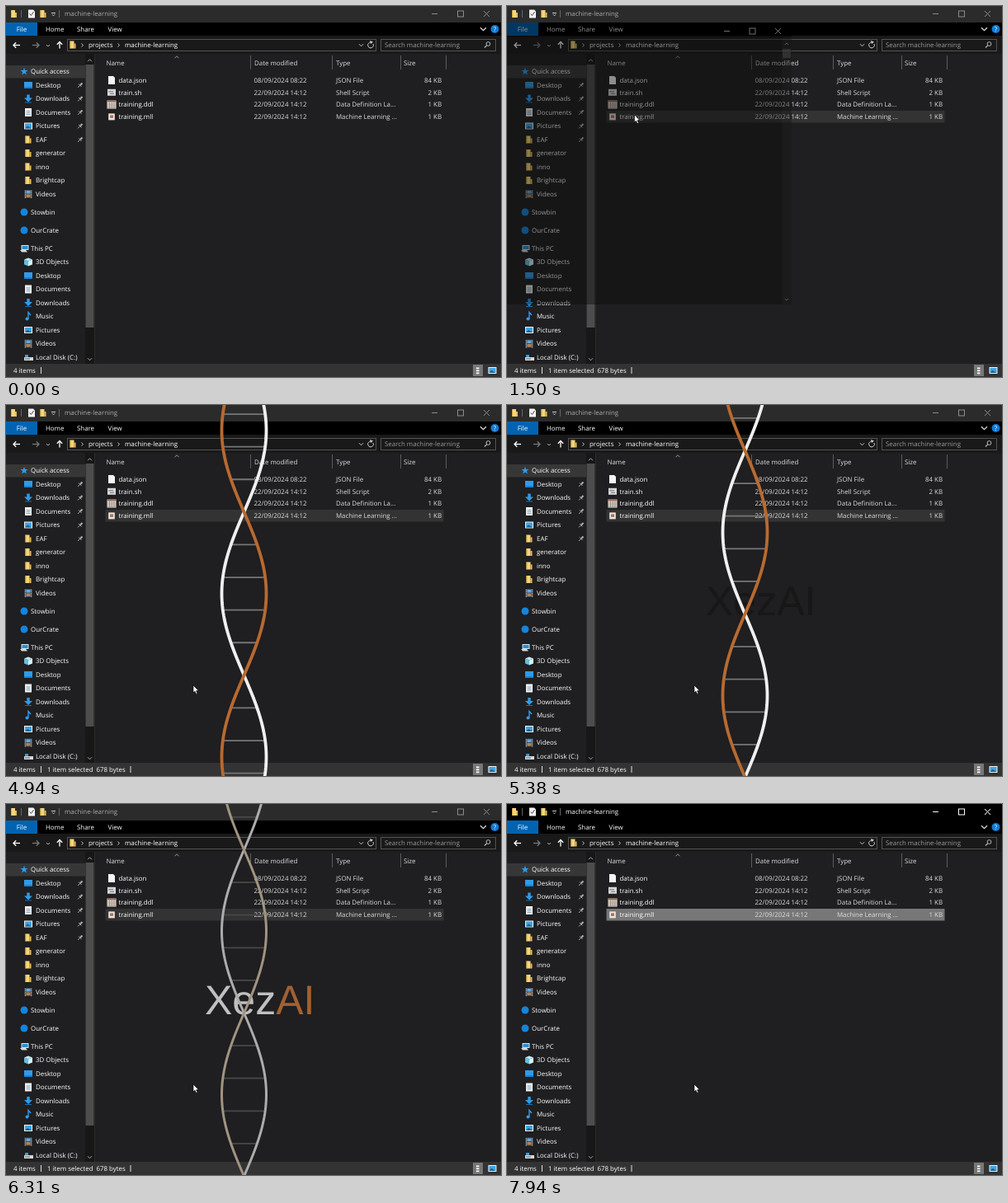
Recreate the animation shown at these times as an HTML page with a canvas. Size 600 px wide and 450 px high, loop 8000 ms.

```html
<!DOCTYPE html>
<html lang="en">
<head>
<meta charset="utf-8">
<title>File window and helix</title>
<style>
html, body { margin: 0; width: 100%; height: 100%; overflow: hidden; background: #000; }
canvas { display: block; width: 600px; height: 450px; }
</style>
</head>
<body>
<canvas width="600" height="450"></canvas>
<script>
const c = document.querySelector('canvas').getContext('2d');
c.textRendering = 'geometricPrecision';
const LOOP = 8000;
const UI = '"Open Sans", "Noto Sans", sans-serif';
const YELLOW = '#f5d67b', BLUE = '#2f9be8';

const clamp = (v) => Math.min(1, Math.max(0, v));
const span = (t, a, b) => clamp((t - a) / (b - a));
const mix = (a, b, k) => a + (b - a) * k;
const mixRgb = (a, b, k) => `rgb(${a.map((v, i) => Math.round(mix(v, b[i], k)))})`;

function box(x, y, w, h, color) {
  c.fillStyle = color;
  c.fillRect(x, y, w, h);
}
function frame(x, y, w, h, color, lw = 1) {
  c.strokeStyle = color;
  c.lineWidth = lw;
  c.strokeRect(x, y, w, h);
}
// Points are given as x, y pairs.
function trace(p) {
  c.beginPath();
  for (let i = 0; i < p.length; i += 2) c.lineTo(p[i], p[i + 1]);
}
function line(p, color, lw = 1) {
  trace(p);
  c.strokeStyle = color;
  c.lineWidth = lw;
  c.stroke();
}
function poly(p, color) {
  trace(p);
  c.fillStyle = color;
  c.fill();
}
function disc(x, y, r, color) {
  c.beginPath();
  c.arc(x, y, r, 0, 7);
  c.fillStyle = color;
  c.fill();
}
function text(s, x, y, color = '#fff', align = 'left', size = 7.9) {
  c.font = `${size}px ${UI}`;
  c.textAlign = align;
  c.fillStyle = color;
  c.fillText(s, x, y + 2.8);
}
// Chevron whose tip points along (dx, dy).
function chevron(x, y, dx, dy, r, color, lw = 1) {
  const h = r / 2;
  line([x - dx * h - dy * r, y - dy * h - dx * r, x + dx * h, y + dy * h,
    x - dx * h + dy * r, y - dy * h + dx * r], color, lw);
}
function arrow(x, y, dx, dy, color) {
  line([x - dx * 4, y - dy * 4, x + dx * 4, y + dy * 4], color, 1.3);
  chevron(x + dx * 2.4, y + dy * 2.4, dx, dy, 3.2, color, 1.3);
}

// Icons, each centred on x, y.
const icons = {
  folder(x, y) {
    box(x - 3.5, y - 4.5, 5, 9, YELLOW);
    box(x + 1.5, y - 1.5, 2, 6, '#e7bd55');
    box(x - 3.5, y - 4.5, 1, 9, '#dcae48');
  },
  star(x, y) {
    const p = [];
    for (let i = 0; i < 10; i++) {
      const r = i % 2 ? 2 : 4.8, a = i * Math.PI / 5 - Math.PI / 2;
      p.push(x + r * Math.cos(a), y + r * Math.sin(a));
    }
    poly(p, BLUE);
  },
  desktop(x, y) {
    box(x - 5, y - 4, 10, 8, '#1683d8');
    box(x - 5, y - 4, 10, 6, BLUE);
  },
  download(x, y) {
    box(x - 1.7, y - 5, 3.4, 5, BLUE);
    poly([x - 5, y - 1, x + 5, y - 1, x, y + 4], BLUE);
    box(x - 4, y + 4, 8, 1, '#1c6fae');
  },
  doc(x, y) {
    box(x - 4, y - 5, 8, 10, '#f2f2f2');
    for (let i = -2; i < 4; i += 2) box(x - 2.5, y + i, 5, 0.8, '#6b93ad');
  },
  picture(x, y) {
    box(x - 5, y - 4, 10, 8, '#f2f2f2');
    box(x - 4, y - 3, 8, 6, '#3ca4e8');
    poly([x - 4, y + 3, x - 1, y, x + 4, y + 3], '#235f80');
  },
  video(x, y) {
    box(x - 4.5, y - 5, 9, 10, '#3a4b5e');
    box(x - 2.5, y - 4, 5, 3.5, '#63abe0');
    box(x - 2.5, y + 0.5, 5, 3.5, '#b98245');
    for (let i = -4; i < 5; i += 2) {
      box(x - 4.2, y + i, 1, 1, '#ddd');
      box(x + 3.2, y + i, 1, 1, '#ddd');
    }
  },
  music(x, y) {
    disc(x - 1.5, y + 3, 2, BLUE);
    line([x, y + 3, x, y - 5, x + 3, y - 1.5], BLUE, 1.4);
  },
  cube(x, y) {
    poly([x, y - 5, x + 5, y - 3, x, y - 1, x - 5, y - 3], '#b9eaf7');
    poly([x - 5, y - 3, x, y - 1, x, y + 5, x - 5, y + 3], '#64bfdc');
    poly([x + 5, y - 3, x, y - 1, x, y + 5, x + 5, y + 3], '#d6f3fa');
  },
  pc(x, y) {
    box(x - 3.5, y - 4, 9, 6, '#cfe6f4');
    box(x - 2.5, y - 3, 7, 4, '#2c8ccc');
    poly([x - 5, y + 2, x + 2, y + 2, x + 4, y + 4.5, x - 3, y + 4.5], '#d8d8d8');
  },
  drive(x, y) {
    box(x - 5, y, 11, 4, '#d7d7d7');
    box(x - 4, y + 1.5, 6, 1, '#666');
    box(x - 4, y - 3, 4, 3, BLUE);
  },
  mark(x, y) { disc(x, y, 4.5, '#1484dc'); },
  file(x, y) {
    poly([x - 4, y - 5, x + 2, y - 5, x + 4, y - 3, x + 4, y + 5, x - 4, y + 5], '#f4f4f4');
  },
  script(x, y) {
    box(x - 5, y - 4, 10, 8, '#d7d7dc');
    box(x - 4, y - 1.5, 6, 1, '#777');
    box(x - 2, y + 1, 5, 1, '#777');
  },
  table(x, y) {
    box(x - 5.5, y - 5, 11, 10, '#e5e0da');
    box(x - 5.5, y - 5, 11, 2, '#a4705a');
    for (let i = 0; i < 3; i++) {
      box(x - 5.5, y - 1 + i * 2.2, 11, 0.7, '#8c7e78');
      box(x - 3 + i * 2.8, y - 3, 0.7, 8, '#8c7e78');
    }
  },
  model(x, y) {
    box(x - 3.8, y - 4, 7.6, 8, '#ece4df');
    box(x - 2, y - 2, 4, 3.5, '#b0705c');
  }
};

// icon, label, y, nesting level, pinned
const sidebar = [
  ['star', 'Quick access', 79.5, 0],
  ['desktop', 'Desktop', 96, 1, 1], ['download', 'Downloads', 112.5, 1, 1],
  ['doc', 'Documents', 129, 1, 1], ['picture', 'Pictures', 145.5, 1, 1],
  ['folder', 'EAF', 162, 1, 1], ['folder', 'generator', 178.5, 1],
  ['folder', 'inno', 195, 1], ['folder', 'Brightcap', 211.5, 1],
  ['video', 'Videos', 228, 1],
  ['mark', 'Stowbin', 250, 0], ['mark', 'OurCrate', 272, 0], ['pc', 'This PC', 294, 0],
  ['cube', '3D Objects', 310.5, 1], ['desktop', 'Desktop', 327, 1],
  ['doc', 'Documents', 343.5, 1], ['download', 'Downloads', 360, 1],
  ['music', 'Music', 376.5, 1], ['picture', 'Pictures', 393, 1],
  ['video', 'Videos', 409.5, 1], ['drive', 'Local Disk (C:)', 426, 1]
];
const files = [
  ['file', 'data.json', '08/09/2024 08:22', 'JSON File', '84 KB'],
  ['script', 'train.sh', '22/09/2024 14:12', 'Shell Script', '2 KB'],
  ['table', 'training.ddl', '22/09/2024 14:12', 'Data Definition La...', '1 KB'],
  ['model', 'training.mll', '22/09/2024 14:12', 'Machine Learning ...', '1 KB']
];

function windowButtons(x, y, gap, color) {
  line([x - 3.5, y, x + 3.5, y], color);
  frame(x + gap - 3.5, y - 3.5, 7, 7, color);
  const k = x + gap * 2;
  line([k - 3.5, y - 3.5, k + 3.5, y + 3.5], color);
  line([k - 3.5, y + 3.5, k + 3.5, y - 3.5], color);
}

function drawTop(focused) {
  box(0, 0, 600, 36, '#000');
  if (!focused) box(0, 0, 600, 20, '#2b2b2b');
  icons.folder(9.5, 9.5);
  box(18, 5, 1, 9, '#666');
  icons.file(31, 9.5);
  line([28.5, 9.5, 30.5, 11.5, 33.5, 7], '#444');
  icons.folder(45, 9.5);
  box(55, 8, 5, 1, '#ccc');
  chevron(57.5, 11, 0, 1, 1.6, '#ccc');
  box(64, 5, 1, 9, '#666');
  text('machine-learning', 71, 9.5, focused ? '#fff' : '#aaa');
  windowButtons(519.5, 9.5, 31.5, focused ? '#fff' : '#8c8c8c');

  box(0, 20, 38, 16, '#0063b1');
  text('File', 19, 28, '#fff', 'center');
  text('Home', 48, 28);
  text('Share', 86, 28);
  text('View', 123.5, 28);
  chevron(578.5, 28, 0, 1, 3.5, '#ddd', 1.2);
  disc(592.5, 28, 5, '#0f7bd7');
  text('?', 592.5, 28, '#fff', 'center');

  box(0, 36, 600, 22, '#191919');
  arrow(13, 47.5, -1, 0, '#fff');
  arrow(36, 47.5, 1, 0, '#777');
  chevron(51, 48, 0, 1, 2, '#aaa');
  arrow(65, 47.5, 0, -1, '#fff');
  frame(74.5, 40.5, 374, 14, '#535353');
  icons.folder(81, 47);
  chevron(92.5, 47.5, 1, 0, 2, '#ccc');
  text('projects', 100, 47);
  chevron(136.5, 47.5, 1, 0, 2, '#ccc');
  text('machine-learning', 144, 47);
  chevron(430.5, 47.5, 0, 1, 2.5, '#ccc');
  c.beginPath();
  c.arc(442, 47.5, 3.4, -0.5, 4.9);
  c.stroke();
  poly([441, 42, 445, 43.5, 442, 46], '#ccc');
  frame(454.5, 40.5, 139, 14, '#535353');
  text('Search machine-learning', 459, 47, '#9a9a9a');
  c.beginPath();
  c.arc(584.5, 46, 2.4, 0, 7);
  c.strokeStyle = '#bbb';
  c.stroke();
  line([582.7, 47.8, 580, 50.5], '#bbb', 1.2);
}

function drawSidebar() {
  box(0, 72, 96, 15.5, '#373737');
  for (const [icon, label, y, level, pinned] of sidebar) {
    icons[icon](level ? 27 : 22, y);
    text(label, level ? 36 : 30, y);
    if (pinned) {
      line([87, y + 3, 90, y], '#aaa');
      line([88, y - 1.5, 91.5, y + 2], '#aaa');
      line([90, y, 92.5, y - 2.5], '#aaa', 2.2);
    }
  }
  box(96, 58, 11, 376, '#171717');
  box(96.5, 71, 10, 319, '#4d4d4d');
  chevron(101.5, 66, 0, -1, 2.5, '#aaa');
  chevron(101.5, 428.5, 0, 1, 2.5, '#aaa');
  box(107, 58, 1, 376, '#2a2a2a');
}

function drawFiles(rowColor) {
  for (const x of [296, 395, 478, 533]) box(x, 60, 1, 17, '#5c5c5c');
  chevron(207, 62, 0, -1, 2.5, '#999');
  text('Name', 121.5, 69, '#dedede');
  text('Date modified', 301, 69, '#dedede');
  text('Type', 400, 69, '#dedede');
  text('Size', 482, 69, '#dedede');
  if (rowColor) box(120.5, 127, 410, 14.5, rowColor);
  files.forEach(([icon, name, date, type, size], i) => {
    const y = 90 + i * 14.8;
    icons[icon](128, y);
    text(name, 136.5, y);
    text(date, 300.5, y, '#dedede');
    text(type, 400, y, '#dedede');
    text(size, 528, y, '#dedede', 'right');
  });
}

function drawStatus(selected) {
  box(0, 434, 600, 16, '#333');
  text('4 items', 9, 442);
  box(42, 438, 1, 8, '#ddd');
  if (selected) {
    text('1 item selected', 50, 442);
    text('678 bytes', 109.5, 442);
    box(150.5, 438, 1, 8, '#ddd');
  }
  box(566, 435, 12, 14, '#777');
  for (let i = 0; i < 3; i++) box(570, 438.5 + i * 3, 3.5, 1.7, '#fff');
  icons.picture(589.5, 442);
}

function drawExplorer(t) {
  const focused = (t > 1180 && t < 1420) || t > 7850;
  const selected = t > 1180;
  const rowColor = selected ? (focused ? '#777' : '#333') : t > 1000 && '#4d4d4d';
  box(0, 0, 600, 450, '#1f1e20');
  drawTop(focused);
  drawSidebar();
  drawFiles(rowColor);
  drawStatus(selected);
}

function drawConsole(alpha) {
  c.globalAlpha = alpha;
  box(0, 20, 345, 18, '#000');
  box(0, 38, 333.5, 324, '#0c0c0c');
  windowButtons(266.5, 30.5, 31, '#fff');
  box(333.5, 38, 11.5, 324, '#171717');
  box(334, 52, 10, 11, '#4d4d4d');
  chevron(339, 46, 0, -1, 2.2, '#aaa');
  chevron(339, 356, 0, 1, 2.2, '#aaa');
  c.globalAlpha = 1;
}

function drawCursor(x, y) {
  const p = [0, 0, 0, 9, 2, 7.2, 3.5, 10.5, 5, 9.8, 3.6, 6.7, 6.3, 6.5];
  c.save();
  c.translate(x, y);
  poly(p, '#fff');
  c.closePath();
  c.strokeStyle = '#000';
  c.lineWidth = 0.6;
  c.stroke();
  c.restore();
}

const HALF = 198, MID = 288.5, AMP = 27;

function drawHelix(t) {
  const cross = mix(130, 55.5, span(t, 4940, 5380));
  const dim = span(t, 5400, 6310), out = span(t, 6310, 7250);
  if (out === 1) return;
  const swing = (y) => AMP * Math.sin(Math.PI * (y - cross) / HALF);
  const width = mix(3.8, 3, dim);
  c.globalAlpha = 1 - out;
  const rung = mixRgb([118, 118, 118], [72, 72, 72], dim);
  for (let i = -4; i < 12; i++) {
    const y = cross + i * HALF / 5, d = swing(y);
    line([MID - d, y, MID + d, y], rung, 1.8);
  }
  const strand = (side, color) => {
    const p = [];
    for (let y = -4; y <= 456; y += 4) p.push(MID + side * swing(y), y);
    line(p, color, width);
  };
  strand(-1, mixRgb([240, 240, 240], [172, 172, 172], dim));
  strand(1, mixRgb([184, 106, 48], [160, 148, 130], dim));
  c.globalAlpha = 1;
}

function drawTitle(t) {
  if (t < 5340 || t > 7850) return;
  const k = span(t, 5380, 6600), dark = [23, 23, 23];
  c.font = '50px "Liberation Sans", Arial, sans-serif';
  c.textAlign = 'left';
  c.fillStyle = mixRgb(dark, [245, 245, 245], k);
  c.fillText('Xez', 241, 255);
  c.fillStyle = mixRgb(dark, [205, 120, 58], k);
  c.fillText('AI', 327.2, 255);
}

function draw(t) {
  if (t >= 1880 && t < 4940) return box(0, 0, 600, 450, '#000');
  drawExplorer(t);
  if (t < 1880) {
    if (t > 1420) drawConsole(mix(0.14, 1, span(t, 1420, 1650)));
    const k = span(t, 350, 1050), e = k * k * (3 - 2 * k);
    drawCursor(mix(300, 154.5, e), mix(455, 132, e));
    if (t > 1660) {
      c.globalAlpha = span(t, 1660, 1880);
      box(0, 0, 600, 450, '#000');
      c.globalAlpha = 1;
    }
  } else {
    drawTitle(t);
    drawHelix(t);
    drawCursor(227, 340);
  }
}

function tick() {
  draw(performance.now() % LOOP);
  requestAnimationFrame(tick);
}
tick();
</script>
</body>
</html>
```
